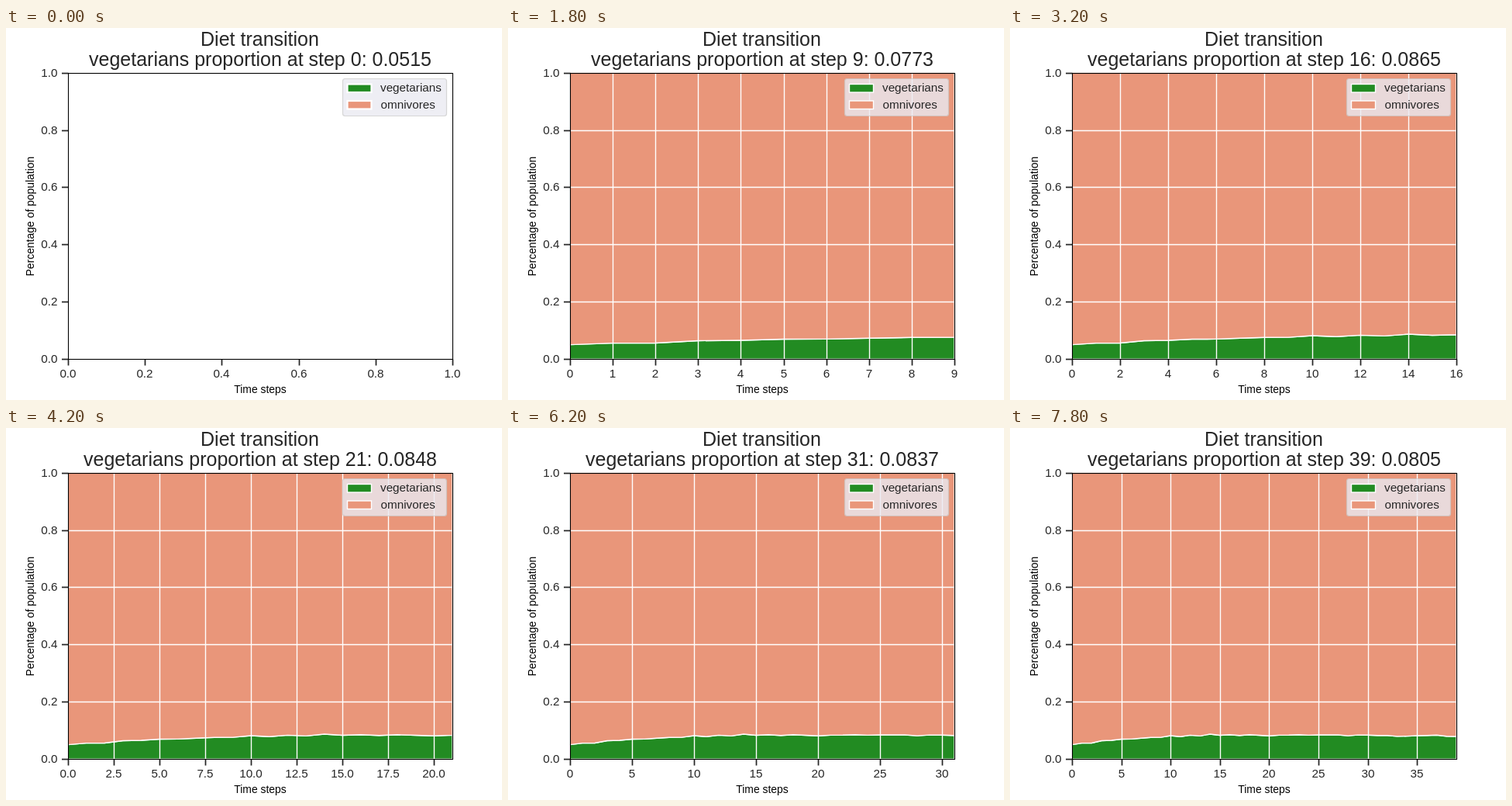
An HTML page for the animation above (8000 ms loop, 640 by 480 pixels).

```html
<!DOCTYPE html>
<html lang="en">
<head>
<meta charset="utf-8">
<title>Diet transition</title>
<style>
  html, body { margin: 0; width: 100%; height: 100%; overflow: hidden; background: #fff; }
  svg { display: block; width: 640px; height: 480px; font-family: "Liberation Sans", Arial, sans-serif; }
  text { fill: #262626; text-anchor: middle; font-size: 15.28px; }
  .title { font-size: 25px; }
  .label { font-size: 13.89px; fill: #000; }
  .end { text-anchor: end; }
  .start { text-anchor: start; }
  .area, .key, .grid { stroke: #fff; stroke-width: 1.39; }
  .veg { fill: #228b22; }
  .omni { fill: #e9967a; }
  .tick { stroke: #262626; stroke-width: 1.74; }
</style>
</head>
<body>
<svg viewBox="0 0 640 480">
  <defs><clipPath id="clip"><rect x="80" y="57.6" width="496" height="369.6"/></clipPath></defs>
  <g id="areas" clip-path="url(#clip)">
    <path id="veg" class="area veg"/>
    <path id="omni" class="area omni"/>
  </g>
  <g id="axes"></g>
  <rect x="80.5" y="58.5" width="496" height="369" fill="none" stroke="#000" stroke-width="1.1"/>
  <rect x="434.5" y="65.5" width="134" height="48" rx="3" fill="#eaeaf2" stroke="#ccc" stroke-width="1.2" opacity=".8"/>
  <rect class="key veg" x="440.5" y="72.5" width="31" height="10.5"/>
  <rect class="key omni" x="440.5" y="94" width="31" height="10.5"/>
  <text class="start" x="483" y="82">vegetarians</text>
  <text class="start" x="483.5" y="104">omnivores</text>
  <text class="title" x="327.5" y="23">Diet transition</text>
  <text class="title" id="status" x="328" y="49"></text>
  <text class="label" x="328" y="471">Time steps</text>
  <text class="label" transform="translate(36 243) rotate(-90)">Percentage of population</text>
</svg>
<script>
const STEP_MS = 200;
const LEFT = 80, WIDTH = 496, BOTTOM = 427.2, HEIGHT = 369.6;

// Vegetarian share per step, in ten-thousandths
const share = [
  515, 571, 573, 654, 668, 709, 711, 744, 768, 773,
  832, 796, 846, 822, 884, 843, 865, 836, 863, 843,
  824, 848, 851, 864, 849, 856, 857, 859, 826, 854,
  851, 837, 836, 807, 814, 830, 837, 849, 811, 805
].map(v => v / 1e4);

const $ = id => document.getElementById(id);
const yAt = v => BOTTOM - HEIGHT * v;
const line = (cls, x1, y1, x2, y2) =>
  `<line class="${cls}" x1="${x1}" y1="${y1}" x2="${x2}" y2="${y2}"/>`;
const label = (cls, x, y, s) => `<text class="${cls}" x="${x}" y="${y}">${s}</text>`;

// Smallest round interval that gives at most nine divisions
const tickStep = span =>
  [0.2, 0.25, 0.5, 1, 2, 2.5, 5].find(s => s >= span / 9);

function drawAxes(span, grid) {
  const step = tickStep(span);
  const digits = step === 0.25 ? 2 : step % 1 ? 1 : 0;
  let out = "", ticks = "";
  for (let v = 0; v <= span + 1e-9; v += step) {
    const x = Math.round(LEFT + WIDTH * v / span);
    if (grid && v > 0 && v < span - 1e-9) out += line("grid", x + 0.5, 58, x + 0.5, 427);
    ticks += line("tick", x + 0.5, 427.5, x + 0.5, 435.5) + label("", x, 451, v.toFixed(digits));
  }
  for (let i = 0; i <= 5; i++) {
    const y = Math.round(yAt(i / 5));
    if (grid && i % 5) out += line("grid", 80, y + 0.5, 576, y + 0.5);
    ticks += line("tick", 72, y + 0.5, 80.5, y + 0.5) + label("end", 66.5, y + 5.3, (i / 5).toFixed(1));
  }
  $("axes").innerHTML = out + ticks;
}

function draw(n) {
  const span = n || 1;
  const edge = share.slice(0, n + 1)
    .map((v, i) => `${(LEFT + WIDTH * i / span).toFixed(2)},${(yAt(v) + 0.5).toFixed(2)}`)
    .join("L");
  $("areas").style.display = n ? "" : "none";
  $("veg").setAttribute("d", `M80,${BOTTOM}L${edge}L576,${BOTTOM}Z`);
  $("omni").setAttribute("d", `M80,57.6L${edge}L576,57.6Z`);
  drawAxes(span, n > 0);
  document.querySelectorAll(".key").forEach(k => k.style.strokeWidth = n ? 1.39 : 2.2);
  $("status").textContent = `vegetarians proportion at step ${n}: ${share[n]}`;
}

let shown = -1;
const start = performance.now();
function tick() {
  const t = Math.max(0, performance.now() - start);
  const n = Math.floor(t / STEP_MS) % share.length;
  if (n !== shown) draw(shown = n);
  requestAnimationFrame(tick);
}
tick();
</script>
</body>
</html>
```
